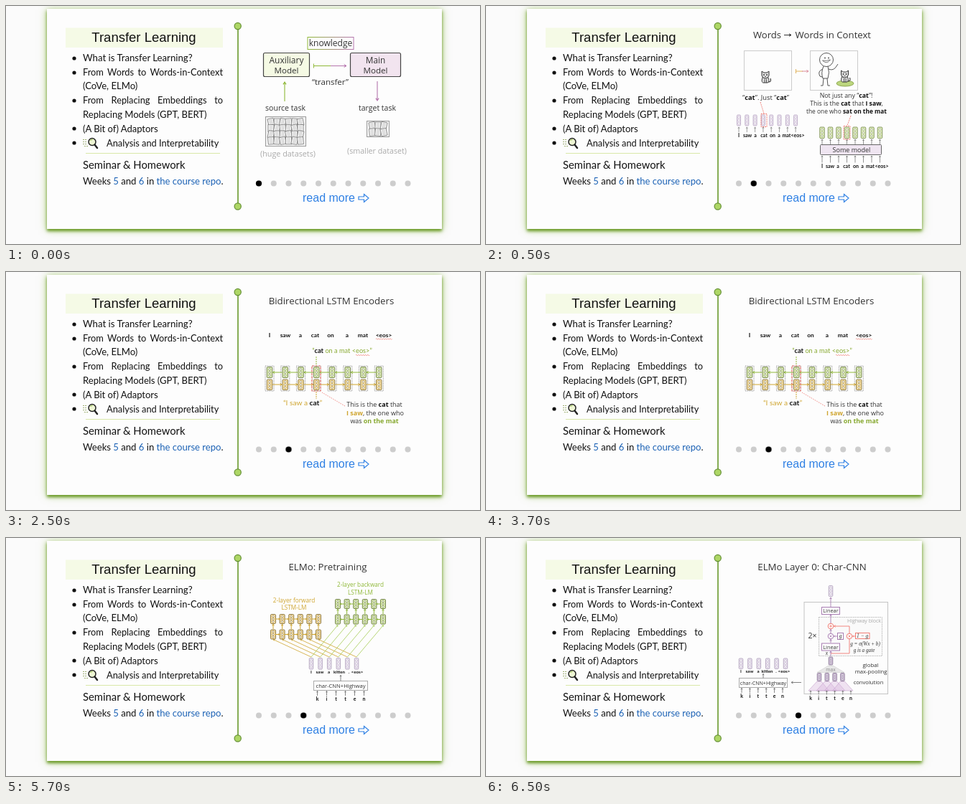
Animation of 660 by 332 pixels, one loop 8000 ms. Source, as an HTML page:

```html
<!DOCTYPE html>
<html lang="en">
<head>
<meta charset="utf-8">
<title>Transfer Learning</title>
<style>
html, body { margin: 0; width: 100%; height: 100%; overflow: hidden; background: #fbfbfb; }
#card { position: absolute; left: 57px; top: 4px; width: 550px; height: 307px; background: #fdfdfd;
  box-shadow: 0 3px 4px #6a9a25, 0 1px 11px #8fb84eb0; }
svg { position: absolute; left: 0; top: 0; }
text, .wide { font-family: "Open Sans", "Noto Sans", sans-serif; fill: #333; white-space: pre; }
.hand, .wide { font-family: Lato, "Open Sans", sans-serif; fill: #111; color: #111; }
.head { font-family: "Liberation Sans", Arial, sans-serif; fill: #111; }
.math { font-family: "Liberation Serif", "Noto Serif", serif; font-style: italic; }
.b { font-weight: 700; fill: #111; }
.wide { position: absolute; left: 107px; width: 195px; font-size: 12.8px; line-height: 20px;
  white-space: nowrap; text-align: justify; text-align-last: justify; }
.slide { opacity: 0; animation: 8s step-end infinite; }
#s0 { animation-name: s0; }
#s1 { animation-name: s1; }
#s2 { animation-name: s2; }
#s3 { animation-name: s3; }
#s4 { animation-name: s4; }
#now { animation: now 8s step-end infinite; }
@keyframes s0 { 0% { opacity: 1; } 6.25% { opacity: 0; } }
@keyframes s1 { 0% { opacity: 0; } 6.25% { opacity: 1; } 31.25% { opacity: 0; } }
@keyframes s2 { 0% { opacity: 0; } 31.25% { opacity: 1; } 56.25% { opacity: 0; } }
@keyframes s3 { 0% { opacity: 0; } 56.25% { opacity: 1; } 81.25% { opacity: 0; } }
@keyframes s4 { 0% { opacity: 0; } 81.25%, 100% { opacity: 1; } }
@keyframes now {
  0% { transform: translateX(0); }
  6.25% { transform: translateX(20.75px); }
  31.25% { transform: translateX(41.5px); }
  56.25% { transform: translateX(62.25px); }
  81.25%, 100% { transform: translateX(83px); }
}
</style>
</head>
<body>
<div id="card"></div>
<svg id="stage" width="660" height="332" viewBox="0 0 660 332"></svg>
<div class="wide" style="top:82px">From Words to Words-in-Context</div>
<div class="wide" style="top:121px">From Replacing Embeddings to</div>
<script>
const GREEN = '#8fb838', GOLD = '#cfa52f', PURPLE = '#a87db2', RED = '#f07a72', GREY = '#aaa';
const TOKENS = ['I', 'saw', 'a', 'cat', 'on', 'a', 'mat', '&lt;eos&gt;'];
const KITTEN = ['I', 'saw', 'a', 'kitten', '.', '&lt;eos&gt;'];
const range = (n, f) => Array.from({ length: n }, (_, i) => f(i)).join('');

// attribute helpers
const text = (x, y, size, str, o = {}) =>
  `<text x="${x}" y="${y}" font-size="${size}" class="${o.cls || ''}" text-anchor="${o.at || 'middle'}"` +
  (o.fill ? ` style="fill:${o.fill}"` : '') + `>${str}</text>`;
const bold = (str, fill = '#111') => `<tspan class="b" style="fill:${fill}">${str}</tspan>`;
const rect = (x, y, w, h, o = {}) =>
  `<rect x="${x}" y="${y}" width="${w}" height="${h}" rx="${o.r || 0}" fill="${o.fill || 'none'}"` +
  ` stroke="${o.c || '#555'}" stroke-width="${o.w || 1}" stroke-dasharray="${o.dash || 'none'}"/>`;
const path = (d, c = '#555', w = 1, o = {}) =>
  `<path d="${d}" fill="${o.fill || 'none'}" stroke="${c}" stroke-width="${w}"` +
  ` stroke-dasharray="${o.dash || 'none'}" stroke-linecap="${o.cap || 'butt'}"/>`;
const circle = (x, y, r, fill, c = 'none', w = 1) =>
  `<circle cx="${x}" cy="${y}" r="${r}" fill="${fill}" stroke="${c}" stroke-width="${w}"/>`;

function arrow(x1, y1, x2, y2, c = '#666', w = 0.8, s = 2.5) {
  const a = Math.atan2(y2 - y1, x2 - x1);
  const tip = d => `${x2 - s * Math.cos(a + d)} ${y2 - s * Math.sin(a + d)}`;
  return path(`M${x1} ${y1}L${x2} ${y2}M${tip(0.55)}L${x2} ${y2}L${tip(-0.55)}`, c, w);
}

// vector cell: rounded box with three small rings
function cell(x, y, h, fill, c, w = 6) {
  return rect(x - w / 2, y, w, h, { r: 1.2, fill, c, w: 0.8 }) +
    range(3, i => circle(x, y + h * (0.22 + 0.28 * i), Math.min(1.4, h * 0.1), '#fff', c, 0.5));
}
const words = (list, xs, y, size) =>
  list.map((s, i) => text(xs[i], y, size, s, { cls: 'hand b' })).join('');
const title = (x, str) => text(x, 44.5, 13.25, str);

function cat(x, y) {
  const c = '#333', fur = '#ddd';
  return path(`M${x - 3} ${y}C${x - 6} ${y + 5} ${x - 5} ${y + 9} ${x - 3} ${y + 9}H${x + 3}C${x + 6} ${y + 8} ${x + 5} ${y + 4} ${x + 3} ${y}`, c, 1, { fill: fur }) +
    path(`M${x + 4} ${y + 8}q5 0 3 -5`, c, 1.1) +
    path(`M${x - 5} ${y - 7}l3 2h4l3 -2v6q-1 4 -5 4t-5 -4z`, c, 1, { fill: fur }) +
    circle(x - 2, y - 2, 0.9, c) + circle(x + 2, y - 2, 0.9, c) +
    path(`M${x - 1} ${y + 4}v5M${x + 1.5} ${y + 4}v5M${x - 1} ${y + 0.5}h2`, c, 0.8);
}

function person() {
  return circle(474, 75, 9.5, '#fff', '#555', 1) +
    circle(472, 72.5, 1, '#555') + circle(477, 72.5, 1, '#555') +
    path('M468.5 76q6 6 11 -1q-5 2 -11 1z', '#555', 0.8, { fill: '#fff' }) +
    path('M470 84q-4 9 -1 17h7q3 -8 0 -17M470 101l-1 10h-3M475 101l1 10h3M469 88q-8 3 -4 10l3 1M477 88q7 3 11 -4l2 -3', '#555', 1);
}

function pages(x, y, cols, rows, dx, dy) {
  return range(cols * rows, i => {
    const px = x + (i % cols) * dx, py = y + Math.floor(i / cols) * dy;
    const turn = ((i * 7) % 5 - 2) * 6;
    return `<g transform="rotate(${turn} ${px} ${py})">` +
      rect(px - 4, py - 5, 8, 10, { fill: '#fff', c: '#777', w: 0.8 }) +
      range(4, k => path(`M${px - 2.5} ${py - 3 + k * 2}h5`, '#999', 0.6)) + '</g>';
  });
}

function overview() {
  return `<defs><linearGradient id="mix"><stop stop-color="${GREEN}"/><stop offset="1" stop-color="#b575ad"/></linearGradient></defs>` +
    rect(420, 43.5, 64, 17, { c: 'url(#mix)' }) + text(452, 56, 12, 'knowledge') +
    rect(358.5, 65.5, 64, 33, { r: 2, fill: '#f5fae4', c: '#444', w: 1.2 }) +
    text(390.5, 80, 12, 'Auxiliary') + text(390.5, 93.5, 11.6, 'Model') +
    rect(479.5, 65.5, 70, 33, { r: 2, fill: '#f2e4ef', c: '#444', w: 1.2 }) +
    text(514.5, 80, 11.8, 'Main') + text(514.5, 93.5, 11.6, 'Model') +
    path('M428.5 80.5v6', GREEN) + path('M428 83.5h24', GREEN) + arrow(452, 83.5, 474, 83.5, '#b575ad', 1, 4) +
    text(451.5, 110, 11.5, '“transfer”') +
    arrow(388, 133, 388, 106, GREEN, 1.1, 4) + arrow(517, 105, 517, 132, '#b575ad', 1.1, 4) +
    text(389, 146, 10.6, 'source task') + text(517, 146, 10.5, 'target task') +
    rect(361.5, 154.5, 56, 41, { c: '#999', fill: '#f4f4f4' }) + pages(369, 162, 6, 4, 8.2, 8.6) +
    rect(502.5, 160.5, 31, 22, { c: '#999', fill: '#f4f4f4' }) + pages(510, 167, 3, 2, 8, 9) +
    text(392.5, 210, 10.8, '(huge datasets)', { fill: GREY }) +
    text(516.5, 206, 10.7, '(smaller dataset)', { fill: GREY });
}

function context() {
  const left = i => 352 + i * 11.3, right = i => 468 + i * 11.5;
  return text(372, 44.5, 13.1, 'Words', { at: 'start' }) + arrow(415, 40.5, 425, 40.5, '#333', 1, 3.5) +
    text(536, 44.5, 13.2, 'Words in Context', { at: 'end' }) +
    rect(359.5, 62.5, 66, 55, { c: '#ccc' }) + rect(451.5, 62.5, 66, 55, { c: '#ccc' }) +
    cat(389, 98) + person() +
    `<ellipse cx="500" cy="108" rx="12" ry="4" fill="#bcd67e" stroke="#7c9a3a" stroke-width=".8"/>` + cat(499.5, 97) +
    path('M431.5 88v6M432 91h9', '#e0b25c') + arrow(440, 91, 449, 91, '#d98c9c', 1, 3) +
    text(389.5, 131, 9.3, `“${bold('cat')}”. Just “${bold('cat')}”`) +
    text(501.5, 128, 8.8, `Not just any “${bold('cat')}”!`) +
    text(502, 138.5, 8.7, `This is the ${bold('cat')} that ${bold('I saw')},`) +
    text(502, 149.5, 8.4, `the one who ${bold('sat on the mat')}`) +
    range(8, i => cell(left(i), 152, 15, '#f1e8f4', '#b3a1bf', 5) +
      arrow(left(i), 176, left(i), 169, '#777', 0.7, 2)) +
    rect(383, 150.5, 8, 18, { c: RED, dash: '2 1' }) +
    path('M382 134L387 150', RED, 0.9, { dash: '2 1' }) +
    words(TOKENS, [352, 364, 375, 387, 399, 408, 418.5, 434], 182.5, 7) +
    range(8, i => cell(right(i), 169, 15.5, '#e2efbf', '#6d8042', 6.5) +
      arrow(right(i), 193, right(i), 186, '#666', 0.7, 2) +
      arrow(right(i), 218.5, right(i), 209, '#666', 0.7, 2)) +
    rect(498, 167.5, 9, 18.5, { c: RED, dash: '2 1' }) +
    path('M508 153L503 167', RED, 0.9, { dash: '2 1' }) +
    rect(465.5, 193.5, 85, 14, { r: 1, fill: '#efe5f1', c: '#666' }) + text(509, 203.5, 9, 'Some model') +
    words(TOKENS, [468, 479, 490, 502, 515, 524, 535, 551], 226, 7);
}

function encoders() {
  const x = i => 367 + i * 21.75;
  const wave = (px, py, n) => path(`M${px} ${py}` + range(n, () => 'q.8 -1.6 1.6 0t1.6 0'), RED, 0.8);
  return title(453, 'Bidirectional LSTM Encoders') +
    words(TOKENS, [367, 389, 410, 430.5, 452, 475, 497, 526], 90.5, 8.4) + wave(515, 93.5, 7) +
    text(468, 113, 9.2, `“${bold('cat')} on a mat &lt;eos&gt;”`, { cls: 'hand', fill: '#86a82e' }) + wave(487, 116, 6) +
    path('M432 118V131', GREEN, 1, { dash: '2 1' }) + path('M432 167V177', GOLD, 1, { dash: '2 1' }) +
    range(8, i => rect(x(i) - 6, 131, 12, 35, { c: '#777', w: 0.8, dash: '1.2 1.2' }) +
      cell(x(i), 132.5, 15, '#dcebb4', '#586a2e', 7.5) + cell(x(i), 150, 14.5, '#f7dfa0', '#75602a', 7.5)) +
    range(7, i => arrow(x(i + 1) - 4, 140, x(i) + 4.5, 140, GREEN, 1, 3) +
      arrow(x(i) + 4, 157, x(i + 1) - 4.5, 157, GOLD, 1, 3)) +
    rect(426, 131, 12, 35, { c: RED, w: 1.2, dash: '3 1.5' }) +
    path('M472 187L440 168', RED, 0.9, { dash: '1.5 1.5' }) +
    text(413, 186, 10.2, `“I saw a ${bold('cat')}”`, { cls: 'hand', fill: GOLD }) +
    text(513, 187.5, 9, `This is the ${bold('cat')} that`) +
    text(514, 199.5, 9, `${bold('I saw', GOLD)}, the one who`) +
    text(513, 211, 8.9, `was ${bold('on the mat', '#86a82e')}`);
}

// two stacked recurrent layers; dir is 1 for forward and -1 for backward
function layers(x0, top, dir, fill, line, edge) {
  const x = i => x0 + i * 12.6;
  return range(6, i => cell(x(i), top, 13, fill, edge, 7) + cell(x(i), top + 21.5, 13, fill, edge, 7) +
      arrow(x(i), top + 21, x(i), top + 13.8, line, 1, 2.5)) +
    [top + 6.5, top + 28].map(y => range(5, i => dir > 0
      ? arrow(x(i) + 3, y, x(i + 1) - 3.5, y, line, 1, 2)
      : arrow(x(i + 1) - 3, y, x(i) + 3.5, y, line, 1, 2))).join('');
}

// character encoder: a box fed by the letters of one word
function charBox(x, w, y, gap, from, size) {
  const letter = i => from + i * (w - 10) / 5;
  const mid = x + w / 2;
  return rect(x, y, w, 13, { c: '#aaa', fill: '#fdfdfd' }) + text(mid, y + 9.3, size, 'char-CNN+Highway') +
    arrow(mid, y, mid, y - gap, '#666', 0.8, 2) +
    range(6, i => arrow(letter(i), y + 20.5, letter(i), y + 14, '#666', 0.8, 2) +
      text(letter(i), y + 27.5, 7, 'kitten'[i], { cls: 'hand b' }));
}

function pretraining() {
  const x = i => 425 + i * 12.6;
  return title(448, 'ELMo: Pretraining') +
    text(401, 90, 8.2, '2-layer forward', { fill: GOLD }) + text(401, 100, 8.2, 'LSTM-LM', { fill: GOLD }) +
    text(493.5, 68, 8.2, '2-layer backward', { fill: GREEN }) + text(493.5, 78.5, 8.2, 'LSTM-LM', { fill: GREEN }) +
    range(6, i => arrow(x(i), 166, 372 + i * 12.6, 141.5, GOLD, 0.8, 2.5) +
      arrow(x(i), 166, 462 + i * 12.7, 121.5, '#a5cc55', 0.8, 2.5)) +
    layers(372, 106.5, 1, '#f6dda0', GOLD, '#75602a') +
    layers(462, 85.5, -1, '#d9eaae', GREEN, '#586a2e') +
    range(6, i => cell(x(i), 167.5, 15.5, '#f0e8f5', '#a898b4', 5.5)) +
    words(KITTEN, [425, 437, 449.5, 464, 477.5, 489], 189, 6.2) +
    charBox(428.5, 75, 199.5, 8, 433.5, 7.6);
}

function charCnn() {
  const lx = i => 452 + i * 11.2, fx = i => 464 + i * 10.8, wx = i => 355 + i * 12.4;
  const up = (a, b) => arrow(480, a, 480, b, PURPLE, 0.9, 2.5);
  const op = (x, y, c, plus) => circle(x, y, 3.8, '#fff', c, 1) +
    (plus ? path(`M${x - 2} ${y}h4M${x} ${y - 2}v4`, c, 0.8)
      : path(`M${x - 1.5} ${y - 1.5}l3 3M${x + 1.5} ${y - 1.5}l-3 3`, c, 0.8));
  const linear = y => rect(467.5, y, 25, 10, { c: PURPLE, fill: '#fff' }) + text(480, y + 7.6, 7.4, 'Linear');
  return title(454, 'ELMo Layer 0: Char-CNN') +
    rect(443, 89.5, 116.5, 128, { c: '#c4c4c4' }) +
    rect(463.5, 110.5, 88, 54, { c: '#bbb', fill: '#fafafa', dash: '1.5 1' }) +
    text(526.5, 118, 7, 'Highway block', { fill: GREY }) +
    cell(480, 66.5, 15, '#f0e8f5', '#a898b4', 5.5) +
    up(96, 83) + linear(96.5) + up(119, 107) + up(133, 127.5) + up(146, 141.5) + up(165, 158) + linear(147) +
    path('M480 161H506V141', RED, 0.9) + path('M506 133V123', RED, 0.9) + arrow(506, 123, 484.5, 123, RED, 0.9, 2.5) +
    op(480, 123, RED, true) + op(480, 137, PURPLE) + op(506, 137, RED) +
    arrow(489, 137, 484.5, 137, PURPLE, 0.8, 2) + arrow(514, 137, 510.5, 137, RED, 0.8, 2) +
    rect(489.5, 132.5, 8, 9, { c: PURPLE, fill: '#fff' }) + text(493.5, 139, 7.5, 'g', { cls: 'math' }) +
    rect(514.5, 132.5, 19.5, 8, { c: RED, fill: '#fff' }) + text(524.2, 139, 7.5, '1 − g', { cls: 'math' }) +
    text(528, 150, 7.2, 'g = σ(Wx + b)', { cls: 'math' }) + text(526.5, 158.5, 7.2, 'g is a gate', { cls: 'math' }) +
    text(474.5, 163, 7.5, 'x', { cls: 'math' }) + text(454.5, 140, 10.5, '2×') +
    cell(480, 166, 11, '#d9c8e2', '#7d6a88', 5.5) +
    path('M477 178H483L499 187.5H461Z', '#ccc', 0.6, { fill: '#e8e8e8' }) + text(480, 185.5, 6.6, 'max', { fill: '#888' }) +
    range(4, i => path(`M${lx(i) - 3} 213L${fx(i) - 3} 200H${fx(i) + 3}L${lx(i + 2) + 3} 213Z`, '#c4a0cb', 0.6, { fill: '#d9b9df66' })) +
    range(4, i => cell(fx(i), 188.5, 11, '#d9c8e2', '#7d6a88', 5.5)) +
    range(6, i => arrow(lx(i), 218.5, lx(i), 213, '#666', 0.7, 2) +
      text(lx(i), 225.5, 7, 'kitten'[i], { cls: 'hand b' })) +
    text(535.5, 179.5, 7.8, 'global') + text(536, 188.5, 7.7, 'max-pooling') + text(532.5, 204, 7.6, 'convolution') +
    range(6, i => cell(wx(i), 168, 14.5, '#f0e8f5', '#a898b4', 5.5)) +
    words(KITTEN, [355, 367, 379, 391.5, 404, 415], 188, 6.2) +
    charBox(352.5, 67, 195.5, 6, 356, 7.1) +
    arrow(439, 201.5, 425, 201.5, '#777', 0.9, 3);
}

function frame() {
  const hand = (y, str, size = 13.1, x = 107) => text(x, y, size, str, { cls: 'hand', at: 'start' });
  const link = str => `<tspan style="fill:#1c62b5">${str}</tspan>`;
  return rect(83, 30.5, 219, 27.5, { fill: '#f5fae6', c: 'none' }) +
    text(192, 50, 18.5, 'Transfer Learning', { cls: 'head' }) +
    [73, 93, 132, 171, 191].map(y => circle(95, y, 2.6, '#111')).join('') +
    hand(77, 'What is Transfer Learning?', 13.2) + hand(116, '(CoVe, ELMo)') +
    hand(155.5, 'Replacing Models (GPT, BERT)', 13.05) + hand(175.5, '(A Bit of) Adaptors', 13) +
    hand(195.5, 'Analysis and Interpretability', 12.8, 140) +
    path('M107 186.5h5M107 189.5h6M107 192.5h5M109 195.5h5', '#9cae72', 1, { dash: '2 1' }) +
    circle(120, 189.5, 5, '#edf5d4', '#222', 1.5) + path('M117.5 188q1 -2 3 -2', '#8fb838', 1) +
    path('M123.5 193.5L127 198', '#222', 2.4, { cap: 'round' }) +
    path('M111 205.5H298', '#d9e8a8', 1.2) +
    hand(227, 'Seminar &amp; Homework', 14.8) +
    hand(249, `Weeks ${link('5')} and ${link('6')} in ${link('the course repo')}.`) +
    path('M323 28V279', '#86ad55', 2) +
    [28, 279.5].map(y => circle(322.7, y, 4.6, '#add665', '#648f34', 1.2)).join('') +
    range(11, i => circle(352 + i * 20.75, 247.5, 4, '#cdcdcd')) +
    `<g id="now">${circle(352, 247.5, 4.1, '#000')}</g>` +
    text(413, 273, 16, 'read more', { cls: 'head', at: 'start', fill: '#2f80e4' }) +
    path('M491 266h7.5v-3.5l6.5 5.5l-6.5 5.5v-3.5h-7.5z', '#2f80e4', 1.2);
}

document.getElementById('stage').innerHTML = frame() +
  [overview, context, encoders, pretraining, charCnn]
    .map((draw, i) => `<g class="slide" id="s${i}">${draw()}</g>`).join('');
</script>
</body>
</html>
```
